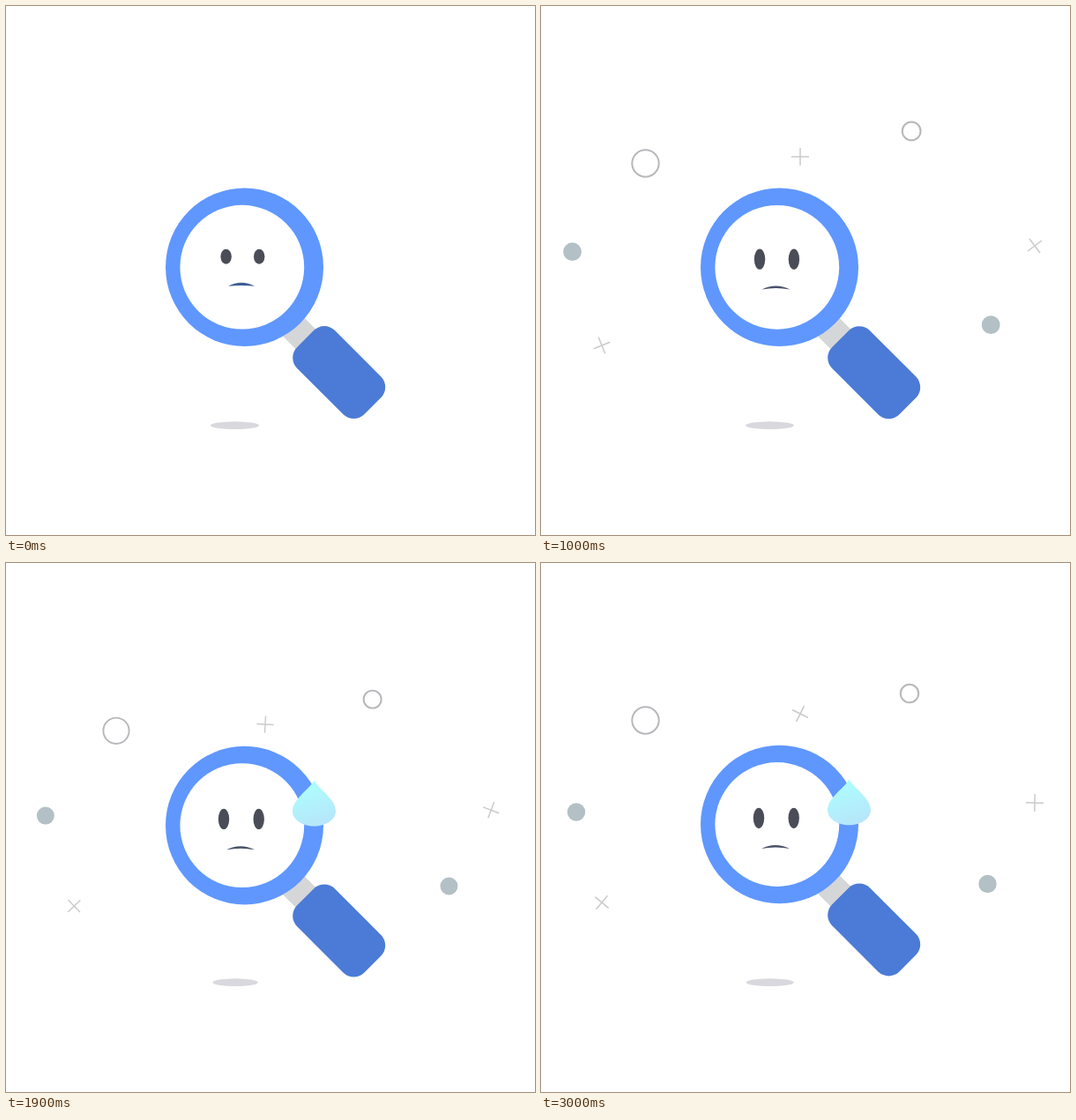
Animation of 600 by 600 pixels, one loop 3.1 s. Source, as an HTML page with a canvas:

```html
<!DOCTYPE html>
<html lang="en">
<head>
<meta charset="utf-8">
<title>Searching</title>
<style>
  html, body { margin: 0; width: 100%; height: 100%; overflow: hidden; background: #fff; }
  canvas { display: block; }
</style>
</head>
<body>
<canvas id="stage" width="600" height="600"></canvas>
<script>
const ctx = document.getElementById('stage').getContext('2d');
const LOOP = 3100, STEP = 100, BOB = 1008;
const ORIGIN = { x: 294, y: 497 };
const RAD = Math.PI / 180;

const clamp = v => Math.max(0, Math.min(1, v));
const mix = (a, b, k) => a + (b - a) * k;
const ramp = (t, from, to) => clamp((t - from) / (to - from));
const ease = k => (1 - Math.cos(Math.PI * k)) / 2;

// Linear interpolation through [time, value] pairs
function track(keys, t) {
  for (let i = 1; i < keys.length; i++) {
    const [t0, v0] = keys[i - 1], [t1, v1] = keys[i];
    if (t < t1) return mix(v0, v1, ramp(t, t0, t1));
  }
  return keys[keys.length - 1][1];
}

// Shoots out, swings back, settles
const near = { rise: [[100, 0], [400, 0.56], [600, 0.87], [700, 1.09]], low: 0.945, fade: [260, 540] };
const far = { rise: [[300, 0], [400, 0.3], [600, 0.89], [700, 1.107]], low: 0.893, fade: [400, 600] };

function spread(group, t) {
  if (t < 700) return track(group.rise, t);
  const peak = group.rise[3][1];
  if (t < 1300) return mix(peak, group.low, ease(ramp(t, 700, 1300)));
  return mix(group.low, 1, ease(ramp(t, 1300, 2300)));
}

const particles = [
  { kind: 'dot', group: near, x: 40, y: 282.5, r: 10.2 },
  { kind: 'dot', group: near, x: 506.5, y: 364, r: 10.2 },
  { kind: 'ring', group: near, x: 418, y: 148, r: 10.2 },
  { kind: 'ring', group: far, x: 118.5, y: 178.5, r: 15.2 },
  { kind: 'plus', group: far, x: 294, y: 171, r: 10, turn: 0, rate: 0.1033 },
  { kind: 'plus', group: far, x: 560, y: 272, r: 10, turn: 53, rate: 0.064 },
  { kind: 'plus', group: far, x: 69, y: 385, r: 10, turn: -22, rate: 0.076 }
];

function ellipse(x, y, rx, ry, fill) {
  ctx.beginPath();
  ctx.ellipse(x, y, rx, ry, 0, 0, 2 * Math.PI);
  ctx.fillStyle = fill;
  ctx.fill();
}

function drawParticle(p, t) {
  const s = spread(p.group, t);
  const alpha = ramp(t, ...p.group.fade);
  if (s <= 0 || alpha <= 0) return;
  ctx.save();
  ctx.globalAlpha = alpha;
  ctx.translate(mix(ORIGIN.x, p.x, s), mix(ORIGIN.y, p.y, s));
  ctx.scale(s, s);
  if (p.kind === 'dot') {
    ellipse(0, 0, p.r, p.r, '#b3c0c5');
  } else if (p.kind === 'ring') {
    ctx.beginPath();
    ctx.arc(0, 0, p.r, 0, 2 * Math.PI);
    ctx.lineWidth = 2;
    ctx.strokeStyle = '#b6b8bb';
    ctx.stroke();
  } else {
    ctx.rotate((p.turn + p.rate * (t - 1000)) * RAD);
    ctx.beginPath();
    ctx.moveTo(-p.r, 0); ctx.lineTo(p.r, 0);
    ctx.moveTo(0, -p.r); ctx.lineTo(0, p.r);
    ctx.lineWidth = 1.5;
    ctx.strokeStyle = '#c9cacc';
    ctx.stroke();
  }
  ctx.restore();
}

function drawHandlePart(draw) {
  ctx.save();
  ctx.translate(377.7, 415.6);
  ctx.rotate(45 * RAD);
  draw();
  ctx.restore();
}

function drawGlass() {
  drawHandlePart(() => {
    ctx.fillStyle = '#d5d6d7';
    ctx.fillRect(-92, -16, 50, 32);
  });
  ellipse(270.5, 296.2, 89.5, 89.8, '#5f97ff');
  ellipse(267.8, 296.2, 70.4, 70.4, '#fff');
  drawHandlePart(() => {
    ctx.beginPath();
    ctx.roundRect(-53.9, -30.3, 107.8, 60.6, 17);
    ctx.fillStyle = '#4b7bd6';
    ctx.fill();
  });
}

function drawFace(t) {
  const look = ramp(t, 700, 1200);
  const open = ramp(t, 0, 300);
  const eyeY = mix(284.2, 289, look);
  const ry = mix(8.5, 11.6, open);
  ellipse(mix(249.6, 247, look), eyeY, 6.2, ry, '#4a4d58');
  ellipse(mix(287.2, 286.7, look), eyeY, 6.2, ry, '#4a4d58');

  const x = mix(267, 266, look);
  const w = track([[0, 15], [400, 14], [1000, 16]], t);
  const y = mix(317.8, 323.8, look);
  ctx.beginPath();
  ctx.moveTo(x - w, y);
  ctx.quadraticCurveTo(x, y - 8, x + w, y);
  ctx.quadraticCurveTo(x, y - mix(1.5, 3, open), x - w, y);
  ctx.fillStyle = open < 0.5 ? '#3f5d94' : '#4a5268';
  ctx.fill();
}

function drawDrop(t) {
  const grow = ramp(t, 1200, 1650);
  if (grow <= 0) return;
  const s = mix(0.77, 1, grow);
  ctx.save();
  ctx.globalAlpha = ramp(t, 1150, 1500);
  ctx.translate(349.5, mix(241.5, 245, grow));
  ctx.scale(s, s);
  ctx.beginPath();
  ctx.moveTo(0, 0);
  ctx.bezierCurveTo(5, 10, 24.5, 21, 24.5, 35);
  ctx.bezierCurveTo(24.5, 45, 13, 52, 0, 52);
  ctx.bezierCurveTo(-13, 52, -24.5, 45, -24.5, 35);
  ctx.bezierCurveTo(-24.5, 21, -5, 10, 0, 0);
  const shade = ctx.createLinearGradient(-6, 8, 8, 52);
  shade.addColorStop(0, '#adfbfd');
  shade.addColorStop(1, '#b7e5fa');
  ctx.fillStyle = shade;
  ctx.fill();
  ctx.restore();
}

function render(t) {
  const phase = (t % BOB) / BOB;
  const dip = 1 - Math.abs(1 - 2 * phase);
  ctx.fillStyle = '#fff';
  ctx.fillRect(0, 0, 600, 600);
  particles.forEach(p => drawParticle(p, t));
  ellipse(259.5 + 2.4 * dip, 475.7, 27.5 - 7.7 * dip, 4.4, '#d8d8de');
  ctx.save();
  ctx.translate(0, 6.2 * dip);
  drawGlass();
  drawFace(t);
  drawDrop(t);
  ctx.restore();
}

const start = performance.now();
function tick() {
  const t = (performance.now() - start) % LOOP;
  render(Math.floor(t / STEP) * STEP);
  requestAnimationFrame(tick);
}
tick();
</script>
</body>
</html>
```
